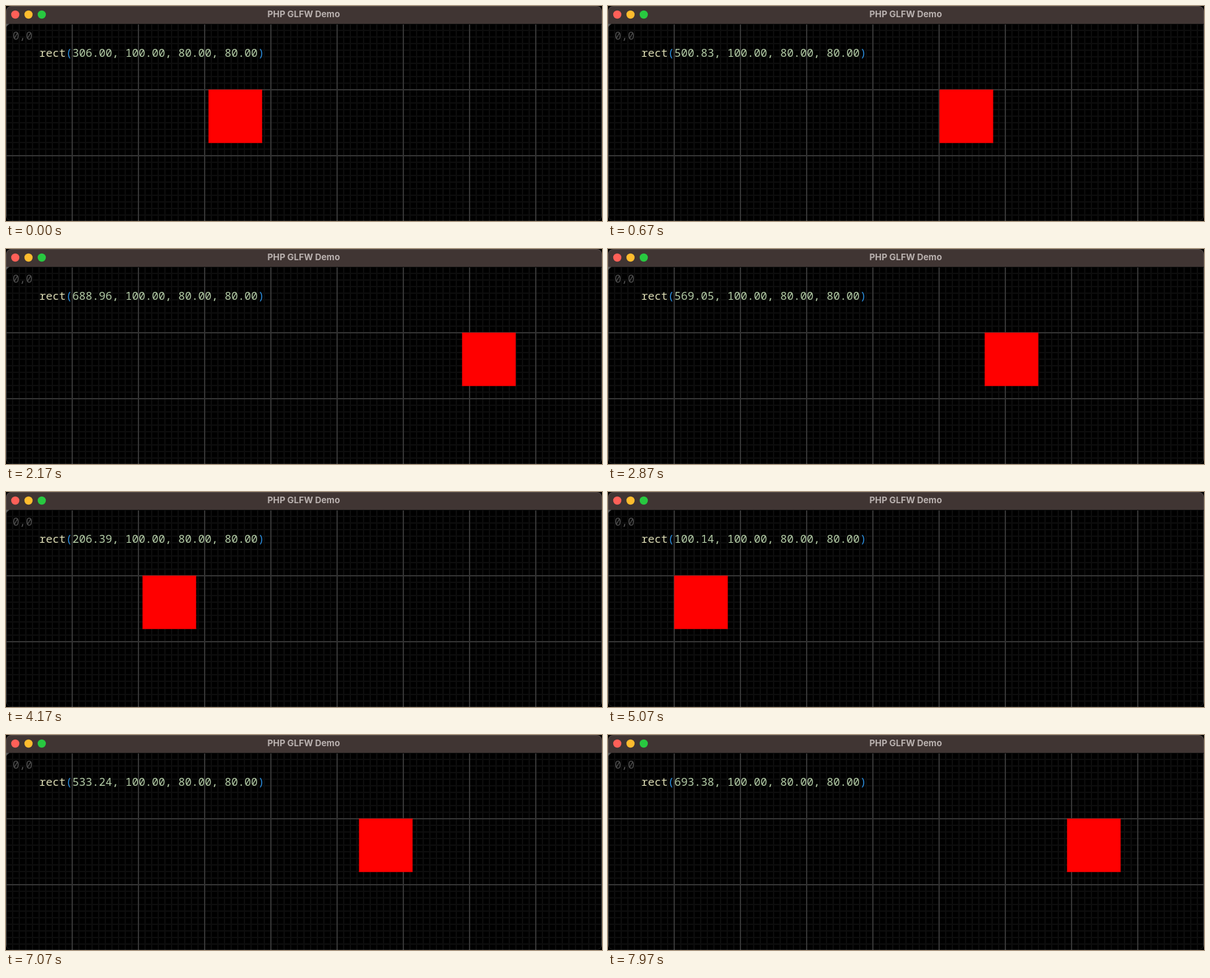
Animation of 900x326 px, one loop 8 s. Source, as an HTML page:

```html
<!DOCTYPE html>
<html lang="en">
<head>
<meta charset="utf-8">
<title>Rect demo</title>
<style>
  html, body { margin: 0; width: 100%; height: 100%; overflow: hidden; background: #000; }
  svg { display: block; width: 900px; height: 326px; }
  .code { font: 16.667px "Noto Sans Mono", monospace; fill: #b5cea8; white-space: pre; }
  .title { font: 700 13.2px Inter, sans-serif; fill: #b9b1af; text-anchor: middle; }
  .name { fill: #dcdcb4; }
  .paren { fill: #2b8fe0; }
</style>
</head>
<body>
<svg viewBox="0 0 900 326">
  <defs>
    <clipPath id="window"><rect width="900" height="326" rx="8"/></clipPath>
    <pattern id="minor" width="10" height="10" x="-1" y="26" patternUnits="userSpaceOnUse">
      <path d="M0 1H10M1 0V10" stroke="#0d0d0d" stroke-width="2" fill="none"/>
    </pattern>
    <pattern id="major" width="100" height="100" x="-1" y="26" patternUnits="userSpaceOnUse">
      <path d="M0 1H100M1 0V100" stroke="#333" stroke-width="2" fill="none"/>
    </pattern>
  </defs>
  <g clip-path="url(#window)">
    <rect y="27" width="900" height="299" fill="url(#minor)"/>
    <rect y="28" width="900" height="298" fill="url(#major)"/>
    <path d="M0 27H5L0 32Z" fill="#555"/>
    <rect id="box" y="127" width="80.5" height="80.5" fill="#f00" stroke="#f00" stroke-opacity=".5"/>
    <text class="code" x="10" y="51" style="fill:#505050">0,0</text>
    <text class="code" x="50.3" y="77"><tspan class="name">rect</tspan><tspan class="paren">(</tspan><tspan id="value"></tspan>, 100.00, 80.00, 80.00<tspan class="paren">)</tspan></text>
    <rect width="900" height="27" fill="#403533"/>
    <circle cx="14" cy="13" r="6.2" fill="#ff6058"/>
    <circle cx="34" cy="13" r="6.2" fill="#febc2e"/>
    <circle cx="54" cy="13" r="6.2" fill="#28c840"/>
    <text class="title" x="449.5" y="17.3">PHP GLFW Demo</text>
  </g>
  <rect x=".5" y=".5" width="899" height="325" rx="7.5" fill="none" stroke="#fff" stroke-opacity=".1"/>
</svg>
<script>
  const LOOP = 8000;
  const box = document.getElementById("box");
  const value = document.getElementById("value");
  const start = performance.now();

  // Three poses per 100 ms, sampled 30.7 ms apart and held.
  function sampleTime(ms) {
    const part = ms % 100;
    const step = (part >= 30) + (part >= 70);
    return ms - part + step * 30.7;
  }

  function draw() {
    const ms = (performance.now() - start) % LOOP;
    const x = 400 + 300 * Math.sin(sampleTime(ms) * 0.0010001 - 0.3187);
    box.setAttribute("x", x);
    value.textContent = x.toFixed(2);
    requestAnimationFrame(draw);
  }
  draw();
</script>
</body>
</html>
```
